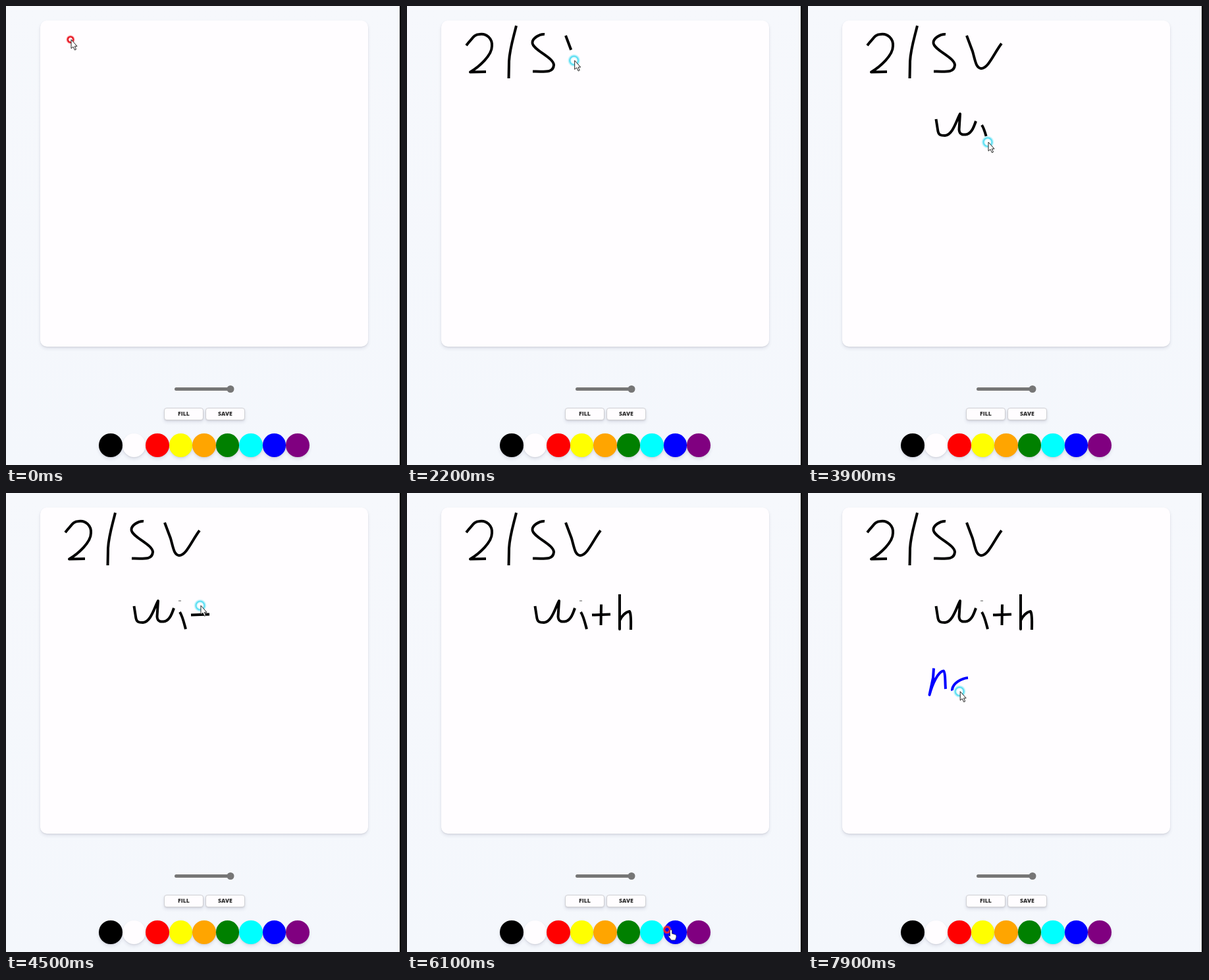
Recreate the animation shown at these times as an HTML page. Size 600 by 698 pixels, loop 8000 ms.

```html
<!DOCTYPE html>
<html lang="en">
<head>
<meta charset="utf-8">
<title>Paint board</title>
<style>
  html, body { margin: 0; width: 100%; height: 100%; overflow: hidden; }
  body { position: relative; background: linear-gradient(#f6f8fc, #f4f7fc); }
  .board, .button, .swatch, .edge { position: absolute; box-sizing: border-box; }
  .board, .button, .swatch { box-shadow: 0 3px 5px rgba(50, 50, 93, .11), 0 1px 2px rgba(0, 0, 0, .08); }
  .board { left: 52px; top: 22px; width: 498px; height: 496px; border-radius: 10px; background: #fffdff; }
  .button {
    top: 611px; width: 60px; height: 19px; border: 1px solid #d0d0d4; border-radius: 4px; background: #fffdff;
    font: 800 8.7px/17px "Open Sans", sans-serif; color: #333; text-align: center;
  }
  .swatch { top: 650px; width: 35.5px; height: 35.5px; border-radius: 50%; }
  .edge { right: 0; top: 0; width: 2px; height: 698px; background: #000; }
  svg { position: absolute; left: 0; top: 0; }
</style>
</head>
<body>
<div class="board"></div>
<div class="button" style="left:240px">FILL</div>
<div class="button" style="left:303px">SAVE</div>
<div class="edge"></div>
<svg id="scene" width="600" height="698" fill="none">
  <defs>
    <radialGradient id="glow">
      <stop offset=".3" stop-color="#fff" stop-opacity=".85"/>
      <stop offset=".48" stop-color="#d5f6fc"/>
      <stop offset=".62" stop-color="#3fd9f0"/>
      <stop offset=".78" stop-color="#7fe6f5" stop-opacity=".7"/>
      <stop offset="1" stop-color="#aef0fa" stop-opacity="0"/>
    </radialGradient>
  </defs>
  <rect x="256" y="580" width="88" height="5" rx="2.5" fill="#767676"/>
  <circle cx="341" cy="582.5" r="5.5" fill="#767676"/>
  <g id="ink"></g>
  <g id="cursor">
    <g id="hover">
      <circle r="5.8" stroke="#f55" stroke-opacity=".35" stroke-width="2"/>
      <circle r="4.2" stroke="#e8202c" stroke-width="2.6"/>
    </g>
    <circle id="press" r="10" fill="url(#glow)"/>
    <path id="arrow" d="M1 0V13.5L4 11L6.5 16L8.5 15L6.3 10.2H10Z" fill="#fff" stroke="#222"/>
    <path id="hand" d="M4.5 1q1.5-2 3 0V6l5 1.5q2 .5 1.5 4l-1.5 4.5H6.5L2 10q0-2 2.5 0Z" fill="#fff" stroke="#222" stroke-width=".7"/>
  </g>
</svg>
<script>
const LOOP = 8000, STEP = 100, LAG = 50;
const $ = id => document.getElementById(id);

["black", "#fffdff", "red", "yellow", "orange", "green", "cyan", "blue", "purple"].forEach((color, i) => {
  const swatch = document.createElement("div");
  swatch.className = "swatch";
  swatch.style.cssText = `left:${141.2 + 35.5 * i}px;background:${color}`;
  document.body.insertBefore(swatch, $("scene"));
});

// Pointer actions: start, end, path, ink colour ("" moves, "none" presses without ink), width.
const actions = [
  [0, 0, "M98 51", ""],
  [110, 650, "M90 60L94 55C99 50 102 43 110 43C121 41 130 50 129 61C129 75 110 92 96 100.5L120 100", "#000"],
  [920, 1190, "M166 30C162 47 156 65 155 84L154.5 110", "#000"],
  [1450, 1820, "M209 43C202 42 190 49 190.5 56C191 67 223 78 223 90C222 101 213 100 191 99.5", "#000"],
  [2080, 2400, "M241 45L250 69C254 83 255 94 263 95C274 95 283 71 294 57", "#000"],
  [2680, 2680, "M196 172", ""],
  [3060, 3580, "M194.500 172L197 188C198 197 202 197 208 197C220 196 225 175 231 164L229.500 188C230 197 237 196 242 195C249 192 252 184 255 175", "#000"],
  [3750, 3900, "M264 181C268 187 270 196 273 207", "#000"],
  [4020, 4060, "M262 164h4", "#555", 1],
  [4180, 4330, "M281 185.500L309 184.500", "#000"],
  [4490, 4680, "M295 169.500L294.500 201", "#000"],
  [4850, 5300, "M323 154V207V194C326 187 332 181 338 180C341 184 340 196 340 208", "#000"],
  [5400, 5400, "M357 275", ""],
  [5950, 6120, "M395 664", ""],
  [6180, 6300, "M404 672", "none"],
  [6980, 7400, "M191 266.500L190 281L184.500 307C189 290 198 271 206 270.500C209 273 208 286 209 298", "#00f"],
  [7710, 7970, "M243 281C233 282 220 289 219 299C219 303 225 303 230 302L242 290", "#00f"],
].map(([start, end, d, color, width = 4]) => {
  const path = document.createElementNS("http://www.w3.org/2000/svg", "path");
  const attrs = { d, stroke: color || "none", "stroke-width": width, "stroke-linejoin": "round" };
  for (const name in attrs) path.setAttribute(name, attrs[name]);
  $("ink").append(path);
  const length = path.getTotalLength();
  const [x, y] = d.match(/[\d.]+/g).map(Number);
  const at = p => length ? path.getPointAtLength(length * p) : { x, y };
  return { start, end, color, path, length, at };
});

const progress = (t, a, b) => b > a ? Math.min(1, Math.max(0, (t - a) / (b - a))) : +(t >= a);
const show = (id, on) => $(id).style.display = on ? "" : "none";

function pointer(t) {
  const i = actions.findLastIndex(a => t >= a.start);
  const a = actions[i], next = actions[i + 1];
  if (t <= a.end || !next) return a.at(progress(t, a.start, a.end));
  const from = a.at(1), to = next.at(0), p = progress(t, a.end, next.start);
  return { x: from.x + (to.x - from.x) * p, y: from.y + (to.y - from.y) * p };
}

function draw(t) {
  for (const { start, end, path, length } of actions) {
    const p = progress(t - LAG, start, end);
    path.style.visibility = p > 0 ? "visible" : "hidden";
    path.setAttribute("stroke-dasharray", p < 1 ? `${length * p} ${length + 1}` : "none");
  }
  const { x, y } = pointer(t);
  const pressed = actions.some(a => a.color && t >= a.start && t <= a.end + LAG);
  $("cursor").setAttribute("transform", `translate(${x} ${y})`);
  show("press", pressed);
  show("hover", !pressed);
  show("hand", y > 650);
  show("arrow", y <= 650);
}

const origin = performance.now();
function tick() {
  const t = (performance.now() - origin) % LOOP;
  draw(Math.floor(t / STEP) * STEP);
  requestAnimationFrame(tick);
}
tick();
</script>
</body>
</html>
```
